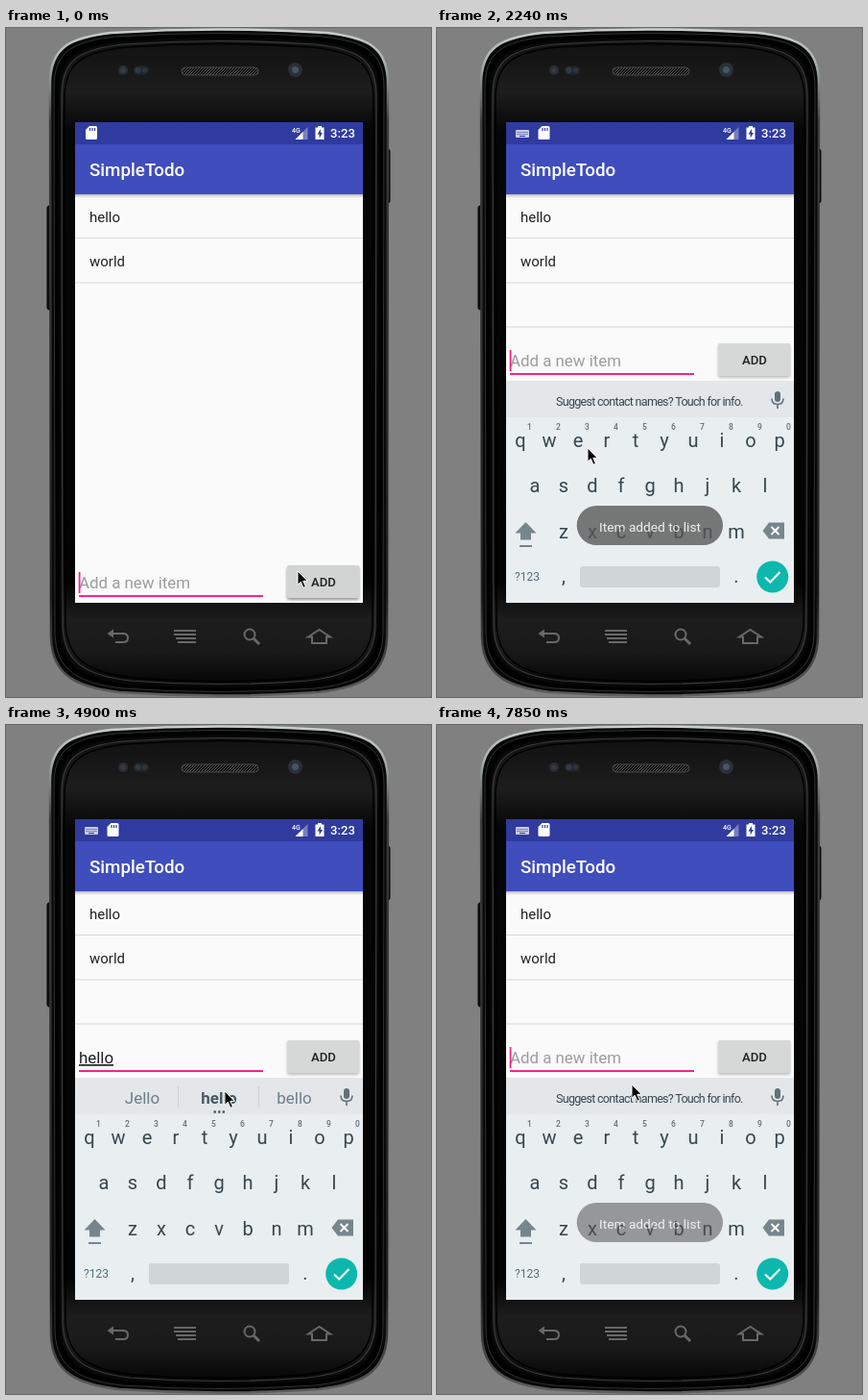
An HTML page that plays this animation: 443x696 px, repeating every 8 s.

```html
<!DOCTYPE html>
<html lang="en">
<head>
<meta charset="utf-8">
<title>Todo list</title>
<style>
  html, body { margin: 0; width: 100%; height: 100%; overflow: hidden; background: #808080; }
  svg { display: block; width: 443px; height: 696px; }
  text { font-family: Roboto, Arial, sans-serif; white-space: pre; }
  .mid { text-anchor: middle; }
  .med { font-weight: 500; }
  .item { font-size: 15px; fill: #212121; }
  .key { font-size: 20px; fill: #37474f; }
  .num { font-size: 8.5px; font-weight: 500; fill: #607178; }
  .word { font-size: 17px; fill: #6d7f87; }
  .bold { font-weight: 700; fill: #455a64; }
  .icon { fill: #76868d; }
</style>
</head>
<body>
<svg viewBox="0 0 443 696" xmlns="http://www.w3.org/2000/svg">
  <defs>
    <linearGradient id="rim" x1="0" y1="0" x2="0" y2="1">
      <stop offset="0" stop-color="#c9d0cc"/><stop offset=".05" stop-color="#aab2ae"/>
      <stop offset=".14" stop-color="#3b3e3d"/><stop offset=".85" stop-color="#1c1c1c"/>
      <stop offset="1" stop-color="#5c5f5e"/>
    </linearGradient>
    <linearGradient id="gloss" x1="0" y1="0" x2="0" y2="1">
      <stop offset="0" stop-color="#111"/><stop offset=".08" stop-color="#1d1d1d"/>
      <stop offset=".14" stop-color="#060606"/><stop offset=".84" stop-color="#030303"/>
      <stop offset=".9" stop-color="#1d1d1d"/><stop offset=".95" stop-color="#191919"/>
      <stop offset="1" stop-color="#050505"/>
    </linearGradient>
    <linearGradient id="drop" x1="0" y1="0" x2="0" y2="1">
      <stop offset="0" stop-opacity=".25"/><stop offset="1" stop-opacity="0"/>
    </linearGradient>
    <pattern id="mesh" width="3" height="3" patternUnits="userSpaceOnUse">
      <rect width="3" height="3" fill="#111"/><path d="M0 3 3 0" stroke="#555" stroke-width=".9"/>
    </pattern>
    <filter id="soft" x="-20%" y="-30%" width="140%" height="180%"><feGaussianBlur stdDeviation="1.6"/></filter>
    <clipPath id="screen"><rect x="72" y="98" width="300" height="500"/></clipPath>
  </defs>

  <rect width="443" height="696" fill="#808080"/>
  <rect x="43" y="185" width="6" height="108" rx="2" fill="#111" stroke="#000"/>
  <rect x="395" y="126" width="5" height="56" rx="2" fill="#151515" stroke="#000"/>
  <g id="body"></g>

  <rect x="183" y="41" width="80" height="8" rx="4" fill="url(#mesh)" stroke="#484848"/>
  <circle cx="122" cy="44" r="5" fill="#2b2e32"/><circle cx="122" cy="44" r="2.5" fill="#343c44"/>
  <rect x="133" y="39.5" width="16" height="9" rx="4.5" fill="#22262b"/>
  <circle cx="137.5" cy="44" r="3" fill="#303a45"/><circle cx="144.500" cy="44" r="2.5" fill="#2d3640"/>
  <circle cx="301.500" cy="43.500" r="7.500" fill="#2a3039"/><circle cx="301.500" cy="43.500" r="3.500" fill="#465363"/>

  <g fill="none" stroke="#686868" stroke-width="2">
    <path d="M109 630H122Q127 630 127 634.500T122 639H114"/>
    <path d="M112 625.500 105.500 630 112 634.500Z" fill="#686868" stroke="none"/>
    <path d="M175 627H198M175 631H198M177 635H198M179 639H198" stroke-width="1.900"/>
    <circle cx="254" cy="631" r="5.500"/><path d="M258 635 264 641" stroke-width="3"/>
    <path d="M315 633.500 326.500 626 338 633.500H334V640H319V633.500Z"/>
  </g>

  <g clip-path="url(#screen)">
    <rect x="72" y="98" width="300" height="500" fill="#fafafa"/>
    <rect x="72" y="173" width="300" height="4" fill="url(#drop)"/>
    <rect x="72" y="121" width="300" height="52" fill="#3f4dbd"/>
    <rect x="72" y="98" width="300" height="23" fill="#303b9f"/>
    <g fill="#fff">
      <g id="kbIcon">
        <rect x="82" y="106" width="14" height="8" rx="1" opacity=".75"/>
        <path d="M83.500 108.500H95M83.500 110.500H95" stroke="#303b9f" stroke-dasharray="1 1"/>
        <path d="M86 112.500H92" stroke="#303b9f"/>
      </g>
      <g id="card">
        <path d="M87 102H93.500Q95 102 95 103.500V114.500Q95 116 93.500 116H84.500Q83 116 83 114.500V106Z"/>
        <path d="M87.500 104V107M90 104V107M92.500 104V107" stroke="#303b9f" stroke-width="1.200"/>
      </g>
      <text x="298" y="108.500" font-size="7" class="med">4G</text>
      <path d="M314.500 103V116H301.500Z" opacity=".35"/><path d="M309.500 108V116H301.500Z"/>
      <path d="M325 102H329V103.500H331.500V116H322.500V103.500H325Z"/>
      <path d="M328 105 324.500 110.500H326.600V114.500L330 109H328Z" fill="#303b9f"/>
      <text x="338" y="114.300" font-size="13.125" class="med">3:23</text>
      <text x="87" y="153.500" font-size="18.750" class="med">SimpleTodo</text>
    </g>
    <text x="87" y="201.500" class="item">hello</text>
    <text x="87" y="247.500" class="item">world</text>
    <path d="M72 218.500H372M72 265H372" stroke="#d8d8d8" stroke-width="1.200"/>
    <path id="newRow" d="M72 311H372" stroke="#d8d8d8" stroke-width="1.200"/>
    <rect id="bar" x="368" y="173" width="4" height="121.500" fill="#b9b9b9"/>

    <g id="form">
      <text id="hint" x="76" y="583" font-size="16.875">Add a new item</text>
      <text id="typed" x="76" y="583" font-size="16.875" fill="#212121" text-decoration="underline"></text>
      <rect x="76" y="590" width="192" height="2" fill="#f5248a"/>
      <rect id="caret" x="75.700" y="566" width="1.800" height="22" fill="#f5248a"/>
      <rect id="shade" x="293" y="561" width="75" height="34" rx="2" filter="url(#soft)"/>
      <rect id="button" x="293" y="559" width="75.500" height="34" rx="2"/>
      <text x="331" y="581.300" font-size="13.125" class="mid med" fill="#212121">ADD</text>
    </g>

    <g id="keyboard">
      <rect x="72" y="367" width="300" height="231" fill="#e9eef0"/>
      <rect x="72" y="367" width="300" height="38" fill="#e3e7ea"/>
      <text id="notice" x="124" y="392.500" font-size="12.500" letter-spacing="-.7" fill="#37474f">Suggest contact names? Touch for info.</text>
      <g id="words">
        <path d="M179.500 376V398M263.500 376V398" stroke="#cbd1d4"/>
        <text x="142" y="393.500" class="mid word"></text>
        <text x="222" y="393.500" class="mid word bold"></text>
        <text x="300.500" y="393.500" class="mid word"></text>
        <path d="M216.500 402.500H228" stroke="#455a64" stroke-width="2.400" stroke-dasharray="2.400 2.200"/>
      </g>
      <rect x="352" y="378" width="6" height="11" rx="3" fill="#607178"/>
      <path d="M349 385.500Q349 391.500 355 391.500T361 385.500M355 391.500V396" fill="none" stroke="#607178" stroke-width="1.600"/>
      <g id="keys"></g>
      <path class="icon" d="M92.500 514 103.500 525.500H98V532.500H87V525.500H81.500ZM86 538H99V540H86Z"/>
      <path class="icon" d="M346 514.500H362V531.500H346L339.500 523Z"/>
      <path d="M348.500 519 356.500 527M356.500 519 348.500 527" stroke="#fff" stroke-width="1.900"/>
      <text x="94" y="575" font-size="12" class="mid" fill="#546e7a">?123</text>
      <rect x="149" y="560" width="146" height="22" rx="3" fill="#d0d5d8"/>
      <circle cx="349.700" cy="571" r="16.500" fill="#0cb8ae"/>
      <path d="M342 571.500 347.300 576.500 357.500 566" fill="none" stroke="#fff" stroke-width="2.200"/>
    </g>

    <g id="toast">
      <rect x="145.700" y="497" width="152.300" height="41" rx="20.500" fill="#545454" fill-opacity=".93"/>
      <text x="222" y="523.500" font-size="13.700" class="mid" fill="#f2f2f2">Item added to list</text>
    </g>
  </g>
  <path id="mouse" d="M0 0V14.300L3.300 11.200 5.900 17.300 8.400 16.200 5.800 10.300H10.300Z" fill="#000" stroke="#fff" stroke-width="1"/>
</svg>

<script>
const $ = id => document.getElementById(id);
const LOOP = 8000, TICKS = 54;

// Phone outline, shrunk by d on every side
function outline(d) {
  const l = 46 + d, r = 398 - d, t = 2 + d, b = 694 - d;
  return `M${l} ${t + 56}C${l} ${t + 18} ${l + 20} ${t + 8} ${l + 64} ${t + 3}Q222 ${t - 4} ${r - 64} ${t + 3}` +
    `C${r - 20} ${t + 8} ${r} ${t + 18} ${r} ${t + 56}L${r - 1} ${b - 60}` +
    `C${r - 2} ${b - 20} ${r - 28} ${b - 8} ${r - 72} ${b - 3}Q222 ${b + 4} ${l + 72} ${b - 3}` +
    `C${l + 28} ${b - 8} ${l + 2} ${b - 20} ${l + 1} ${b - 60}Z`;
}
const layers = [[0, '#080808', 'url(#rim)', 2.5], [4, '#000', '#303231', 1],
  [9, '#0b0b0b', '#050505', 2], [12, 'url(#gloss)', '#3a3c3b', 1.2], [15, 'none', '#000', 1.5]];
$('body').innerHTML = layers.map(([d, fill, line, w]) =>
  `<path d="${outline(d)}" fill="${fill}" stroke="${line}" stroke-width="${w}"/>`).join('');

const label = (c, x, y, kind) => `<text x="${x}" y="${y}" class="mid ${kind}">${c}</text>`;
const row = (chars, x, y, kind) => [...chars].map((c, i) => label(c, x + 30 * i, y, kind)).join('');
$('keys').innerHTML = row('qwertyuiop', 87, 435.5, 'key') + row('1234567890', 96.5, 418, 'num') +
  row('asdfghjkl', 102, 482.5, 'key') + row('zxcvbnm', 132, 530.5, 'key') +
  label(',', 132, 577, 'key') + label('.', 312, 577, 'key');

// Tables of [tick, value...]
const mousePath = [[0, 304, 565], [2, 304, 565], [5, 215, 580], [8, 138, 590], [11, 138, 590],
  [13, 149, 500], [15, 157, 437], [32, 157, 437], [33, 228, 381], [36, 318, 348], [38, 318, 348],
  [40, 286, 349], [44, 213, 354], [46, 203, 374], [54, 203, 374]];
const toastPath = [[0, 0], [1, 0], [4, 1], [14, 1], [15, .84], [16, .5], [17, .2], [18, .05], [19, 0],
  [38, 0], [41, 1], [51, 1], [52, .85], [53, .6], [54, .5]];
const barPath = [[0, 0], [37, 0], [38, 1], [48, 1], [51, 0], [54, 0]];
const blinkStarts = [0.7, 23, 26, 27, 28, 29, 38];
const typing = [[23, 'h'], [26, 'he'], [27, 'hel'], [28, 'hell'], [29, 'hello'], [38, '']];
const guesses = [[23, ['', 'h', '']], [24, ['his', 'h', 'he']], [26, ['her', 'he', 'hey']],
  [27, ['help', 'hel', 'held']], [28, ["he'll", 'hell', 'hello']], [30, ['Jello', 'hello', 'bello']]];

const last = (table, n) => table.filter(e => e[0] <= n).pop();
function mix(table, n, k = 1) {
  const i = table.findIndex(e => e[0] > n), a = table[i - 1], b = table[i];
  return a[k] + (b[k] - a[k]) * (n - a[0]) / (b[0] - a[0]);
}
const show = (id, on) => $(id).setAttribute('opacity', +on);
const move = (id, x, y) => $(id).setAttribute('transform', `translate(${x} ${y})`);

function draw(n) {
  const open = n >= 13, pressed = n < 2 || n === 37;
  const text = (last(typing, n) || [0, ''])[1];
  const start = blinkStarts.filter(s => s <= n).pop();
  const blink = start === undefined || (n - start) % 6.75 < 3.375;

  move('mouse', mix(mousePath, n, 1), mix(mousePath, n, 2));
  show('toast', mix(toastPath, n));
  show('bar', mix(barPath, n));
  show('newRow', n >= 2);
  show('kbIcon', n >= 12);
  move('card', n >= 12 ? 22.5 : 0, 0);
  move('form', 0, open ? -231 : 0);
  move('keyboard', 0, open ? 0 : n === 12 ? 110 : 240);

  $('typed').textContent = text;
  show('hint', !text);
  $('hint').setAttribute('fill', n > 1 && n < 13 ? '#7a7a7a' : '#9c9c9c');
  $('caret').setAttribute('x', 75.7 + (text ? $('typed').getComputedTextLength() : 0));
  show('caret', blink);
  $('button').setAttribute('fill', pressed ? '#d2d4d3' : '#d6d7d7');
  show('shade', pressed ? .4 : .24);

  show('notice', !text);
  show('words', text);
  if (text) document.querySelectorAll('#words text').forEach((el, i) => {
    el.textContent = last(guesses, n)[1][i];
  });
  show('words', text ? 1 : 0);
}

let shown = -1;
function frame() {
  const t = performance.now() % LOOP;
  const n = Math.floor((t + 4) / LOOP * TICKS) % TICKS;
  if (n !== shown) draw(shown = n);
  requestAnimationFrame(frame);
}
frame();
</script>
</body>
</html>
```
